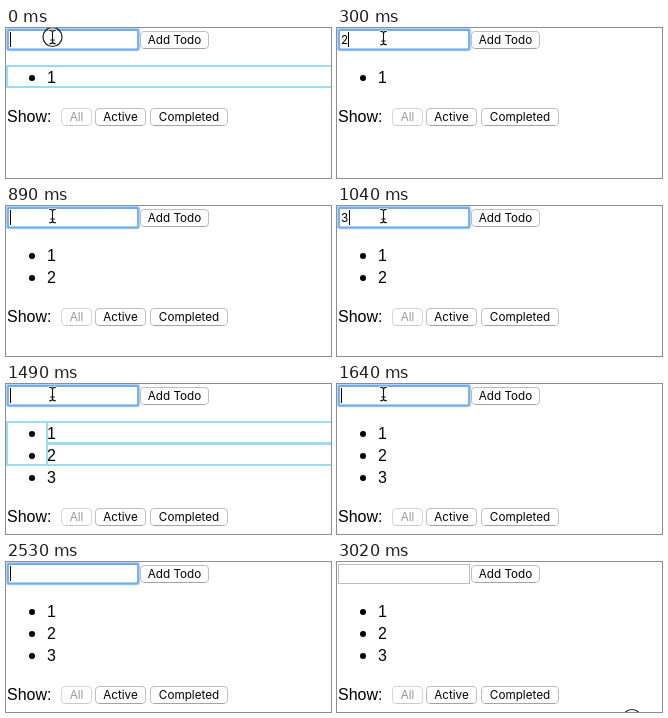
Recreate the animation shown at these times as an HTML page. Size 325 by 150 pixels, loop 3120 ms.

```html
<!DOCTYPE html>
<html lang="en">
<head>
<meta charset="utf-8">
<title>Todo list</title>
<style>
  html, body { margin: 0; width: 100%; height: 100%; overflow: hidden; background: #fff; }
  svg { display: block; width: 325px; height: 150px; }
  .page { font: 16px "Liberation Sans", Arial, sans-serif; }
  .ui { font: 11.7px Inter, Roboto, sans-serif; }
  .btn rect { fill: #fff; stroke: #bebebe; }
  .btn path { stroke: #a4a4a4; }
  .off rect { stroke: #d6d6d6; }
  .off path { stroke: #cacaca; }
  .off text { fill: #989898; }
  .flash rect { fill: none; stroke: #9adcf5; stroke-width: 2; }
</style>
</head>
<body>
<svg id="stage" viewBox="0 0 325 150">
  <rect width="325" height="150" fill="#fff"/>
  <rect id="field" x="1.5" y="2.5" width="131" height="19" fill="#fff" stroke="#bdbdbd"/>
  <g id="focus" fill="none">
    <rect x="1" y="1" width="132" height="21" rx="2" stroke="#b5d5f7" stroke-width="2.6"/>
    <rect x="2" y="2" width="130" height="19.5" rx="1" stroke="#6facee" stroke-width="1.8"/>
  </g>
  <text id="typed" class="ui" x="4" y="16"></text>
  <rect id="caret" y="4" width="1" height="15"/>
  <g id="add"></g>
  <g id="items" class="page"></g>
  <g id="filters"><text class="page" x="1" y="93.5">Show:</text></g>
  <g id="flash" class="flash"></g>
  <circle id="click" r="9.5" fill="none" stroke="#222" stroke-width="1.2"/>
  <g id="beam" fill="none" stroke-linecap="round">
    <path id="beamHalo" stroke="#fff" stroke-width="2.4"/>
    <path id="beamLine" stroke="#111" stroke-width="1.1"/>
  </g>
  <path id="arrow" d="M124 104V118.5L127.3 115.4L129.6 120.4L132 119.3L129.8 114.5H134.5Z"
        stroke="#fff" stroke-width="1"/>
</svg>
<script>
const LOOP = 3120;
const ROW = 22;
const $ = id => document.getElementById(id);
const show = (id, on) => $(id).setAttribute("visibility", on ? "visible" : "hidden");
const move = (id, x, y) => $(id).setAttribute("transform", `translate(${x} ${y})`);
const within = (t, from, to) => t >= from && t < to;

function button(label, x, y, w, off) {
  return `<g class="btn ui${off ? " off" : ""}" transform="translate(${x} ${y})">
    <rect x=".5" y=".5" width="${w - 1}" height="17" rx="3.5"/>
    <path d="M4 17.5H${w - 4}"/>
    <text x="${w / 2}" y="13" text-anchor="middle">${label}</text></g>`;
}

$("add").innerHTML = button("Add Todo", 134, 3, 69);
$("filters").insertAdjacentHTML("beforeend",
  button("All", 55, 80, 31, true) + button("Active", 89, 80, 51) + button("Completed", 144, 80, 78));

$("items").innerHTML = [1, 2, 3].map((n, i) =>
  `<g id="item${n}" transform="translate(0 ${i * ROW})">
    <circle cx="26" cy="50" r="3"/><text x="41" y="55">${n}</text></g>`).join("");

const beam = "M-3 -6.8Q0 -6.8 0 -4.5Q0 -6.8 3 -6.8M0 -4.5V4.5M-3 6.8Q0 6.8 0 4.5Q0 6.8 3 6.8M-1.8 3H1.8";
$("beamHalo").setAttribute("d", beam);
$("beamLine").setAttribute("d", beam);

// Outlines around the list and the rows that were just re-rendered.
const outline = (x, y, h) => `<rect x="${x}" y="${y}" width="${330 - x}" height="${h}"/>`;
const listBox = rows => outline(1, 38, rows * ROW - 1);
const rowBox = i => outline(41, 38 + i * ROW, ROW - 1);
const flashes = [
  { from: 0, to: 150, boxes: listBox(1) },
  { from: 740, to: 890, boxes: listBox(2) + rowBox(0) },
  { from: 1490, to: 1640, boxes: listBox(2) + rowBox(0) + rowBox(1) }
];

let lastFlash = null;
function draw(t) {
  const count = t < 740 ? 1 : t < 1490 ? 2 : 3;
  for (let n = 1; n <= 3; n++) show("item" + n, n <= count);
  move("filters", 0, (count - 1) * ROW);

  const flash = flashes.find(f => within(t, f.from, f.to));
  if (flash !== lastFlash) {
    $("flash").innerHTML = flash ? flash.boxes : "";
    lastFlash = flash;
  }

  const typed = within(t, 300, 740) ? "2" : within(t, 1040, 1490) ? "3" : "";
  $("typed").textContent = typed;
  $("caret").setAttribute("x", typed === "2" ? 11 : typed === "3" ? 12 : 4);
  const focused = t < 3020;
  show("focus", focused);
  show("field", !focused);
  show("caret", focused && !within(t, 1940, 2390));

  if (t < 2090) move("beam", 46.5, t < 150 ? 9 : 10);
  else move("beam", 56.5, 18);
  show("beam", t < 2390);
  show("arrow", within(t, 2390, 2530));

  move("click", ...(t < 150 ? [46.5, 9] : [295, 157]));
  show("click", t < 150 || t >= 3020);
}

const start = performance.now();
function tick() {
  draw((performance.now() - start) % LOOP);
  requestAnimationFrame(tick);
}
draw(0);
requestAnimationFrame(tick);
</script>
</body>
</html>
```
